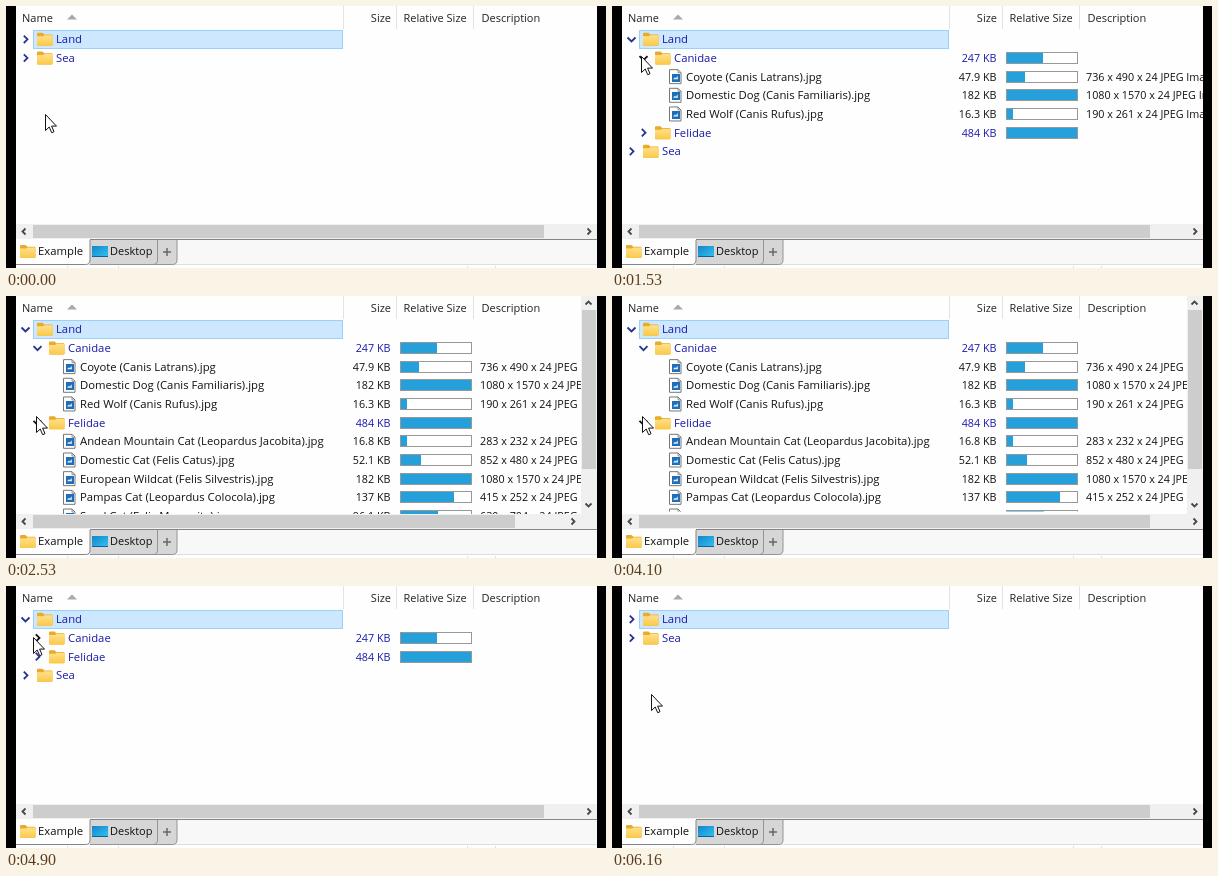
Write an HTML page that moves like this. It is 600 by 262 pixels and loops after 6.2 s.

```html
<!DOCTYPE html>
<html lang="en">
<head>
<meta charset="utf-8">
<title>File tree</title>
<style>
  html, body { margin: 0; width: 100%; height: 100%; overflow: hidden; background: #000; }
  svg { display: block; width: 100%; height: 100%; }
  text { font: 11.3px "Open Sans", "Noto Sans", sans-serif; fill: #111; white-space: pre; }
  .head { font-size: 11px; fill: #222; }
  .num { font-size: 10.75px; }
  .dir { fill: #1a1aaa; }
  .end { text-anchor: end; }
  rect, .line { shape-rendering: crispEdges; }
</style>
</head>
<body>
<svg viewBox="0 0 600 262" xmlns="http://www.w3.org/2000/svg">
  <defs>
    <clipPath id="clip"><rect id="clipBox" x="10" y="23"/></clipPath>
    <linearGradient id="gold" x2="0" y2="1">
      <stop stop-color="#ffe08a"/><stop offset="1" stop-color="#fbc94a"/>
    </linearGradient>
    <linearGradient id="sky" x2="1" y2="1">
      <stop stop-color="#1583c8"/><stop offset="1" stop-color="#30c4f2"/>
    </linearGradient>
    <g id="folder">
      <path d="M0-5.5q0-1 1-1h4.500l1.800 1.800h7.200q1 0 1 1V5.500q0 1-1 1H1q-1 0-1-1z" fill="#e9ab2b"/>
      <path d="M0-3h6l1.500-1h7q1 0 1 1V5.500q0 1-1 1H1q-1 0-1-1z" fill="url(#gold)"/>
    </g>
    <g id="file">
      <path d="M.5-7h8.500l3 3V7H.5z" fill="#fff" stroke="#777"/>
      <path d="M9-7v3h3" fill="none" stroke="#777" stroke-width=".8"/>
      <rect x="2.500" y="-3" width="8" height="8" fill="#1f6fb8"/>
      <path d="M4 2.500l2-2 1 1L8.500-1 9 2.500z" fill="#e4f2fb"/>
    </g>
  </defs>
  <rect x="10" width="581" height="262" fill="#fefefe"/>
  <g id="view"></g>
  <g id="tabs">
    <rect x="10" y="233" width="581" height="26" fill="#f8f8f8"/>
    <path class="line" d="M10 233.500H591" stroke="#858585"/>
    <path class="line" d="M10 258.500H591M61.500 260v2M112.500 260v2M461.500 260v2M489.500 260v2" stroke="#dedede"/>
    <path d="M84 234h87v20q0 4.500-4.500 4.500H84z" fill="#d6d6d6"/>
    <path d="M151.500 234v20q0 4.500-4.500 4.500H84M171 234v20q0 4.500-4.500 4.500H147" fill="none" stroke="#949494"/>
    <path d="M10 233h74v21q0 4.500-4.500 4.500H10z" fill="#fefefe"/>
    <path d="M84 234v20q0 4.500-4.500 4.500H10" fill="none" stroke="#858585"/>
    <use href="#folder" x="14" y="245.500"/>
    <text x="32" y="248.800">Example</text>
    <rect x="86" y="240" width="16" height="11" fill="url(#sky)"/>
    <rect x="86" y="250" width="16" height="1" fill="#16609a"/>
    <text x="104" y="248.800" style="font-size:11px">Desktop</text>
    <path d="M157 246h8M161 242v8" stroke="#686868" stroke-width="1.500"/>
  </g>
  <path id="cursor" d="M.5.5V16.500L4.200 13 6.700 18.700 9 17.700 6.600 12.100H11.500z" fill="#fff" stroke="#111"/>
</svg>
<script>
const LOOP = 6200, FPS = 30, PITCH = 18.67;
const $ = id => document.getElementById(id);

const canidae = [
  ["Coyote (Canis Latrans)", "47.9", "736 x 490"],
  ["Domestic Dog (Canis Familiaris)", "182", "1080 x 1570"],
  ["Red Wolf (Canis Rufus)", "16.3", "190 x 261"]
];
const felidae = [
  ["Andean Mountain Cat (Leopardus Jacobita)", "16.8", "283 x 232"],
  ["Domestic Cat (Felis Catus)", "52.1", "852 x 480"],
  ["European Wildcat (Felis Silvestris)", "182", "1080 x 1570"],
  ["Pampas Cat (Leopardus Colocola)", "137", "415 x 252"],
  ["Sand Cat (Felis Margarita)", "96.1", "630 x 704"]
];

// Cursor moves: first tick, last tick, end point
const home = [39, 108];
const moves = [
  [0, 14, 20, 28.5], [27, 34, 29, 50], [51, 70, 30, 120], [124, 137, 26.5, 51],
  [150, 157, 10, 25], [162, 166, 14.5, 26], [173, 185, ...home]
];

function cursorAt(k) {
  let [x, y] = home;
  for (const [a, b, toX, toY] of moves) {
    const p = Math.min(1, Math.max(0, (k - a) / (b - a)));
    const e = p * p * (3 - 2 * p);
    x += (toX - x) * e;
    y += (toY - y) * e;
  }
  return [x, y];
}

const within = (k, a, b) => k >= a && k < b;
const text = (x, y, s, cls = "") => `<text x="${x}" y="${y}" class="${cls}">${s}</text>`;
const rect = (x, y, w, h, fill, more = "") =>
  `<rect x="${x}" y="${y}" width="${w}" height="${h}" fill="${fill}" ${more}/>`;
const stroke = (d, color, w) => `<path d="${d}" fill="none" stroke="${color}" stroke-width="${w}"/>`;

function chevron(x, y, open, [cx, cy]) {
  const hot = Math.abs(cx - x) <= 6 && Math.abs(cy - y) <= 8;
  const d = open ? `M${x - 4} ${y - 1.8}l4 4 4-4` : `M${x - 1.7} ${y - 3.7}l3.7 3.7-3.7 3.7`;
  return stroke(d, hot ? "#111" : "#25358f", 1.8);
}

function bar(y, part) {
  const top = Math.round(y - 6);
  return rect(394.5, top + .5, 71, 11, "#fff", 'stroke="#989898"') +
    rect(395, top + 1, Math.round(70 * part), 10, "#26a0da");
}

function folder(y, depth, name, open, cur, size) {
  const x = 19.5 + depth * 12;
  return chevron(x, y, open, cur) +
    `<use href="#folder" x="${x + 11.5}" y="${y}"/>` + text(x + 30.5, y + 4, name, "dir") +
    (size ? text(384.5, y + 4, size + " KB", "num end dir") + bar(y, size / 484) : "");
}

function file(y, [name, size, dim], described) {
  return `<use href="#file" x="57" y="${y}"/>` + text(74, y + 4, name + ".jpg") +
    text(384.5, y + 4, size + " KB", "num end") + bar(y, size / 182) +
    (described ? text(474, y + 4, dim + " x 24 JPEG Image", "num") : "");
}

function header() {
  return rect(10, 0, 581, 23, "#fefefe") + text(16, 16, "Name", "head") +
    '<path d="M61 13.500l5-5 5 5z" fill="#a9a9a9"/>' +
    text(385, 16, "Size", "head end") + text(397.5, 16, "Relative Size", "head") +
    text(475.5, 16, "Description", "head") +
    '<path class="line" d="M337.500 0V23M390.500 0V23M467.500 0V23" stroke="#e2e2e2"/>';
}

function scrollbars(tall, narrow) {
  const right = narrow ? 575 : 591;
  const arrow = d => stroke(d, "#484848", 1.8);
  let s = rect(10, 218, 581, 15, "#f0f0f0") + rect(27, 219, (narrow ? 509 : 538) - 27, 13, "#cdcdcd") +
    arrow("M19.500 222.500l-3 3 3 3") + arrow(`M${right - 9.5} 222.500l3 3-3 3`);
  if (tall) s += rect(575, 0, 16, 218, "#f0f0f0") + rect(576, 14, 14, 159, "#cdcdcd") +
    arrow("M579.500 8.500l3-3 3 3") + arrow("M579.500 207.500l3 3 3-3");
  return s;
}

function draw(k) {
  const cur = cursorAt(k);
  const land = within(k, 20, 173), dogs = within(k, 39, 147), cats = within(k, 72, 124);
  // While the group closes, the lower bar widens one tick before the side bar goes
  const tall = within(k, 74, 124), narrow = within(k, 74, 123);
  let row = 0;
  const next = () => 33.3 + PITCH * row++;

  let list = rect(27.5, 24.5, 309, 18, "#cde8fe", 'stroke="#99d1fb"');
  list += folder(next(), 0, "Land", land, cur);
  if (land) {
    list += folder(next(), 1, "Canidae", dogs, cur, 247);
    if (dogs) canidae.forEach((f, i) => list += file(next(), f, k >= 41 + i * 2.5));
    list += folder(next(), 1, "Felidae", cats, cur, 484);
    if (cats) felidae.forEach(f => list += file(next(), f, k >= 76));
  }
  list += folder(next(), 0, "Sea", false, cur);

  $("clipBox").setAttribute("width", (tall ? 575 : 591) - 10);
  $("clipBox").setAttribute("height", (tall && !narrow ? 215.5 : 218) - 23);
  $("view").innerHTML = header() + `<g clip-path="url(#clip)">${list}</g>` + scrollbars(tall, narrow);
  $("cursor").setAttribute("transform", `translate(${cur.map(Math.round)})`);
}

const start = performance.now();
let shown = -1;
function tick() {
  const t = (performance.now() - start) % LOOP;
  // The 7 ms lead lines ticks up with times rounded down to 10 ms
  const k = Math.floor((t + 7) * FPS / 1000) % (LOOP * FPS / 1000);
  if (k !== shown) draw(shown = k);
  requestAnimationFrame(tick);
}
tick();
</script>
</body>
</html>
```
